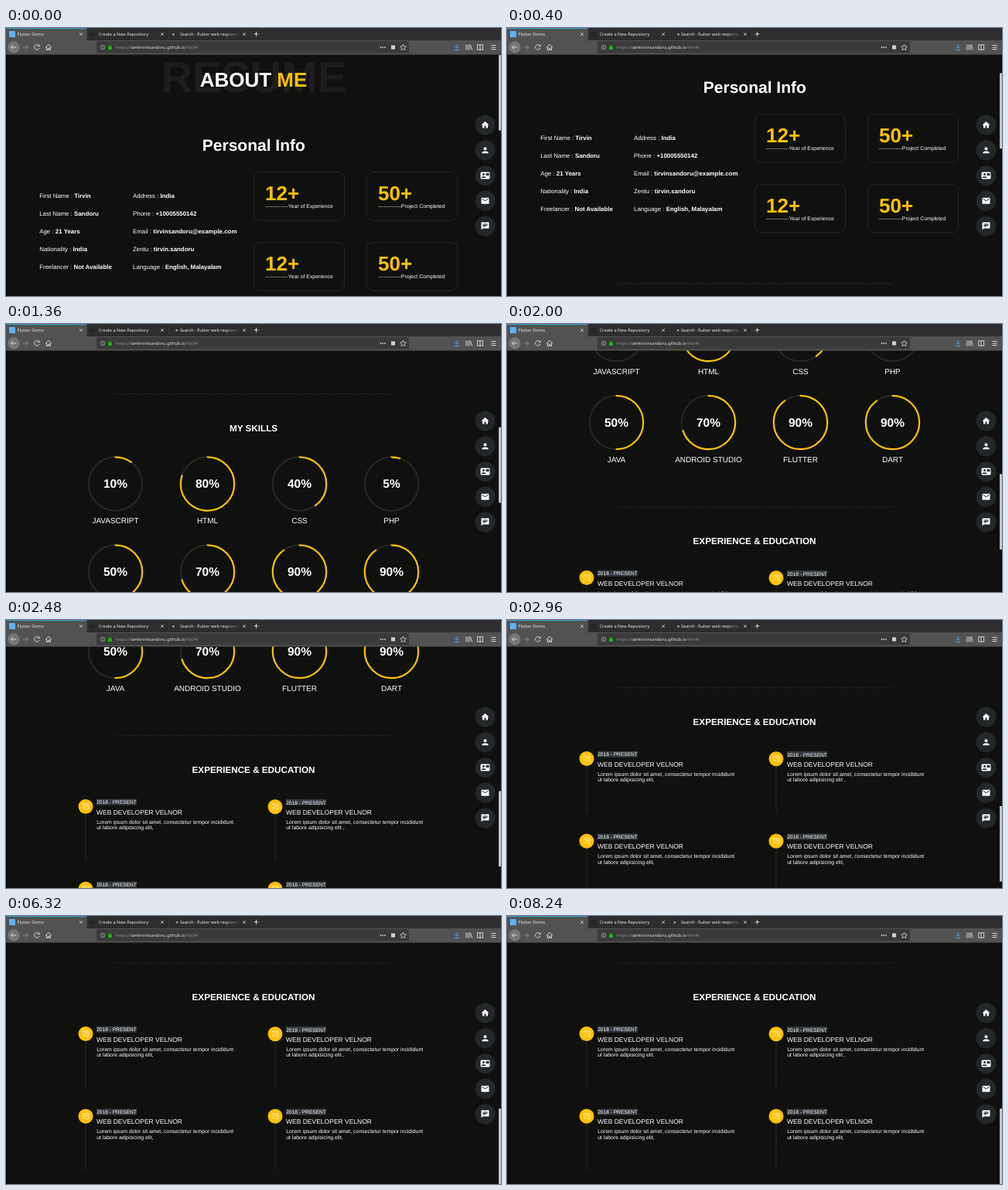
Animation of 640x347 px, one loop 8.32 s. Source, as an HTML page:

```html
<!DOCTYPE html>
<html lang="en">
<head>
<meta charset="utf-8">
<title>Portfolio scroll</title>
<style>
  html, body { margin: 0; width: 100%; height: 100%; overflow: hidden; background: #10110f; }
  svg { display: block; width: 100%; height: 100%; }
  text { font-family: "Liberation Sans", Arial, sans-serif; fill: #fff; white-space: pre; text-rendering: geometricPrecision; }
  .ui { font-family: "Noto Sans", sans-serif; font-size: 5.6px; fill: #e4e4e2; }
  .bold { font-weight: 700; }
  .mid { text-anchor: middle; }
  .gold { fill: #ffc107; }
  .line { fill: none; stroke: #d2d2d0; stroke-width: 1; }
</style>
</head>
<body>
<svg viewBox="0 0 640 347">
  <defs>
    <linearGradient id="fade" gradientUnits="userSpaceOnUse" x1="284" x2="303" y1="0" y2="0">
      <stop stop-color="#e4e4e2"/><stop offset="1" stop-color="#e4e4e2" stop-opacity="0"/>
    </linearGradient>
  </defs>
  <g id="page"></g>
  <g id="side"></g>
  <rect id="thumb" x="637" width="3" fill="#c6c6c4"/>
  <g id="chrome"></g>
</svg>
<script>
const $ = id => document.getElementById(id);
const text = (x, y, size, content, cls = '', extra = '') =>
  `<text x="${x}" y="${y}" font-size="${size}" class="${cls}" ${extra}>${content}</text>`;
const rect = (x, y, w, h, fill, extra = '') =>
  `<rect x="${x}" y="${y}" width="${w}" height="${h}" fill="${fill}" ${extra}/>`;
const circle = (x, y, r, fill, extra = '') =>
  `<circle cx="${x}" cy="${y}" r="${r}" fill="${fill}" ${extra}/>`;
const line = (d, extra = '') => `<path class="line" d="${d}" ${extra}/>`;

function about() {
  const rows = [
    ['First Name', 'Tirvin', 'Address', 'India'],
    ['Last Name', 'Sandoru', 'Phone', '+10005550142'],
    ['Age', '21 Years', 'Email', 'tirvinsandoru@example.com'],
    ['Nationality', 'India', 'Zentu', 'tirvin.sandoru'],
    ['Freelancer', 'Not Available', 'Language', 'English, Malayalam'],
  ];
  const field = (x, y, label, value) =>
    text(x, y, 7.9, `${label} : <tspan class="bold">${value}</tspan>`);
  const card = (x, y, count, label) =>
    rect(x, y, 117, 62.5, 'none', 'rx="8" stroke="#252624"') +
    text(x + 14.5, y + 36.5, 26, count, 'bold gold') +
    text(x + 14.5, y + 46.5, 6.9, '-'.repeat(13) + label);
  return text(320.5, 83, 56, 'RESUME', 'bold mid', 'style="fill:#1d1e1c"') +
    text(320, 76, 26, 'ABOUT <tspan class="gold">ME</tspan>', 'bold mid') +
    text(320.3, 159.3, 21, 'Personal Info', 'bold mid') +
    rows.map(([a, b, c, d], i) => field(43.2, 219.8 + i * 23, a, b) + field(164, 219.8 + i * 23, c, d)).join('') +
    [186.5, 277.5].map(y => card(320.5, y, '12+', 'Year of Experience') +
      card(466.5, y, '50+', 'Project Completed')).join('');
}

const section = (y, title) =>
  line(`M142 ${y}H498`, 'style="stroke:#272826" stroke-dasharray="2 1"') +
  text(320, y + 48, 11.7, title, 'bold mid');

function skills() {
  const items = [['JAVASCRIPT', 10], ['HTML', 80], ['CSS', 40], ['PHP', 5],
    ['JAVA', 50], ['ANDROID STUDIO', 70], ['FLUTTER', 90], ['DART', 90]];
  return items.map(([name, percent], i) => {
    const x = 141.5 + i % 4 * 119, y = 522.5 + Math.floor(i / 4) * 114;
    return circle(x, y, 34.7, 'none', 'stroke="#262725" stroke-width="2"') +
      circle(x, y, 34.7, 'none', `stroke="#ffc107" stroke-width="2.2" stroke-linecap="round"
        pathLength="100" stroke-dasharray="${percent} 100" transform="rotate(-90 ${x} ${y})"`) +
      text(x, y + 5.4, 15.5, percent + '%', 'bold mid') +
      text(x, y + 51.2, 10, name, 'mid');
  }).join('');
}

function timeline() {
  const entry = (x, y, tail) =>
    line(`M${x} ${y}v69.5`, 'style="stroke:#323331" stroke-dasharray="2 .6"') +
    circle(x, y, 9.5, '#ffc107') +
    line(`M${x - 3.8} ${y - 1.4}v-2h7.6v6.6h-3M${x - 1.7} ${y - 1.2}h3.4v2M${x - 3.6} ${y + .6}q2.6 0 2.6 2.8M${x - 3.6} ${y + 2.4}l1 1`,
      'style="stroke:#fff6d8;stroke-width:.9"') +
    rect(x + 13.8, y - 9.7, 52.2, 8, '#32373b') +
    text(x + 14.2, y - 3.2, 6.6, '2018 - PRESENT') +
    text(x + 14, y + 10, 8.5, 'WEB DEVELOPER VELNOR') +
    text(x + 14.2, y + 22, 6.9, 'Lorem ipsum dolor sit amet, consectetur tempor incididunt') +
    text(x + 14.2, y + 29.4, 6.9, 'ut labore adipisicing elit' + tail);
  return entry(103, 837.5, ',') + entry(348, 837.7, ' ,') +
    entry(103, 944.3, ',') + entry(348, 944.3, ',');
}

function sideMenu() {
  const icons = [
    '<path d="M10 20v-6h4v6h5v-8h3L12 3 2 12h3v8z"/>',
    '<circle cx="12" cy="8" r="4"/><path d="M4 20v-2c0-5 16-5 16 0v2z"/>',
    '<path fill-rule="evenodd" d="M2 3h20l2 2v14l-2 2H2l-2-2V5zM8 6a3 3 0 1 0 .1 0zM2 18h12c0-5-12-5-12 0zM14 6v6h8V6z"/>',
    '<path fill-rule="evenodd" d="M3 4h18l1 1v14l-1 1H3l-1-1V5zM4 6v2l8 5 8-5V6l-8 5z"/>',
    '<path fill-rule="evenodd" d="M3 2h18l1 1v14l-1 1H6l-4 4V3zM6 6v2h12V6zM6 9v2h12V9zM6 12v2h8v-2z"/>',
  ];
  return icons.map((icon, i) => {
    const y = 125.5 + i * 32.75;
    return circle(619.5, y, 13, '#22272a') +
      `<g fill="#fff" transform="translate(613.5 ${y - 6}) scale(.5)">${icon}</g>`;
  }).join('');
}

function browser() {
  const close = x => line(`M${x - 2} 6l4 4m0 -4l-4 4`, 'style="stroke-width:.8"');
  const tabs = rect(0, 0, 640, 16, '#2c2d2e') + rect(0, 0, 104.5, 17, '#525351') +
    rect(0, 0, 104.5, 1, '#2e9fd8') +
    [105, 210, 316].map(x => rect(x, 2, .6, 12, '#444544')).join('') +
    rect(4, 4, 8, 8, '#58b4f2') + circle(112, 8, 3.5, '#24282b') +
    text(14.5, 10, 5.6, 'Flutter Demo', 'ui') +
    text(119.8, 10, 5.6, 'Create a New Repository', 'ui') +
    text(225, 10, 5.6, 'Search · flutter web responsive', 'ui', 'style="fill:url(#fade)"') +
    [97, 202, 308].map(close).join('') + line('M320.5 7.8h6m-3 -3v6') +
    '<circle id="loader" cy="8.2" r="1.2" fill="#b4b6b8"/>';
  const navigation = rect(0, 16, 640, 18.5, '#525351') +
    circle(10, 25, 7, '#747573', 'stroke="#92938f" stroke-width=".6"') +
    line('M13.5 25h-7m3 -3l-3 3l3 3') +
    line('M21.5 25h7m-3 -3l3 3l-3 3', 'style="stroke:#858684"') +
    line('M42.5 23a3.2 3.2 0 1 0 .4 3M43.2 21.4v2.4h-2.4') +
    line('M51 25.2l4 -3.8l4 3.8M52.5 24.5v4h1.7v-2.5h1.6v2.5h1.7v-4');
  const address = rect(117, 17, 404, 15.5, '#393a39', 'rx="1.5"') +
    circle(125, 25, 2.9, 'none', 'stroke="#b4b4b2" stroke-width=".7"') +
    line('M125 24.5v2M125 23v.7', 'style="stroke-width:.8"') +
    rect(132, 24, 5, 4, '#14b80a', 'rx=".6"') +
    line('M133 24.5v-1.3q1.5 -2.6 3 0v1.3', 'style="stroke:#14b80a"') +
    text(142, 27, 5.6, 'https://<tspan fill="#dcdcda">iamtirvinsandoru.github.io</tspan>/tks/#/', 'ui', 'style="fill:#8f908e"') +
    [484.5, 487.2, 489.9].map(x => circle(x, 25, .9, '#d2d2d0')).join('') +
    rect(498, 22.5, 5, 5, '#d2d2d0') +
    line('M513.5 21.2l1.1 2.6l2.8 .2l-2.1 1.8l.7 2.8l-2.5 -1.5l-2.5 1.5l.7 -2.8l-2.1 -1.8l2.8 -.2z', 'style="stroke-width:.8"');
  const tools =
    line('M583 21v5m-2.5 -2.3l2.5 2.5l2.5 -2.5M579.8 28.4h6.4', 'style="stroke:#45a1ff"') +
    line('M594.8 21.5v7m2.3 -7v7m2.2 -7v7m1.2 -6.7l2 6.5') +
    line('M609.6 21.8h7v6.4h-7zM613 22v6') +
    line('M627.5 22.4h6m-6 2.6h6m-6 2.6h6');
  return tabs + navigation + address + tools;
}

$('page').innerHTML = about() + section(406, 'MY SKILLS') + skills() +
  section(745.8, 'EXPERIENCE &amp; EDUCATION') + timeline();
$('side').innerHTML = sideMenu();
$('chrome').innerHTML = browser();

const LOOP = 8320, STEP = 80, VIEW = 312, MAX_SCROLL = 685;
const thumbHeight = VIEW * VIEW / (VIEW + MAX_SCROLL);
$('thumb').setAttribute('height', thumbHeight);

// [time, scroll offset]
const scrollKeys = [[80, 0], [800, 169], [1360, 315.5], [2000, 509], [2480, 596],
  [2720, 640], [2800, 640], [3200, MAX_SCROLL]];

function scrollAt(t) {
  if (t <= scrollKeys[0][0]) return 0;
  const next = scrollKeys.findIndex(([time]) => t <= time);
  if (next < 0) return MAX_SCROLL;
  const [t0, y0] = scrollKeys[next - 1], [t1, y1] = scrollKeys[next];
  return y0 + (y1 - y0) * (t - t0) / (t1 - t0);
}

function draw(now) {
  const t = Math.floor(now % LOOP / STEP) * STEP;
  const scroll = scrollAt(t);
  $('page').setAttribute('transform', `translate(0 ${-scroll})`);
  $('thumb').setAttribute('y', 35 + scroll / MAX_SCROLL * (VIEW - thumbHeight));
  $('loader').setAttribute('cx', 219 - 2.6 * Math.cos(2 * Math.PI * t / 832));
  requestAnimationFrame(draw);
}
draw(performance.now());
</script>
</body>
</html>
```
